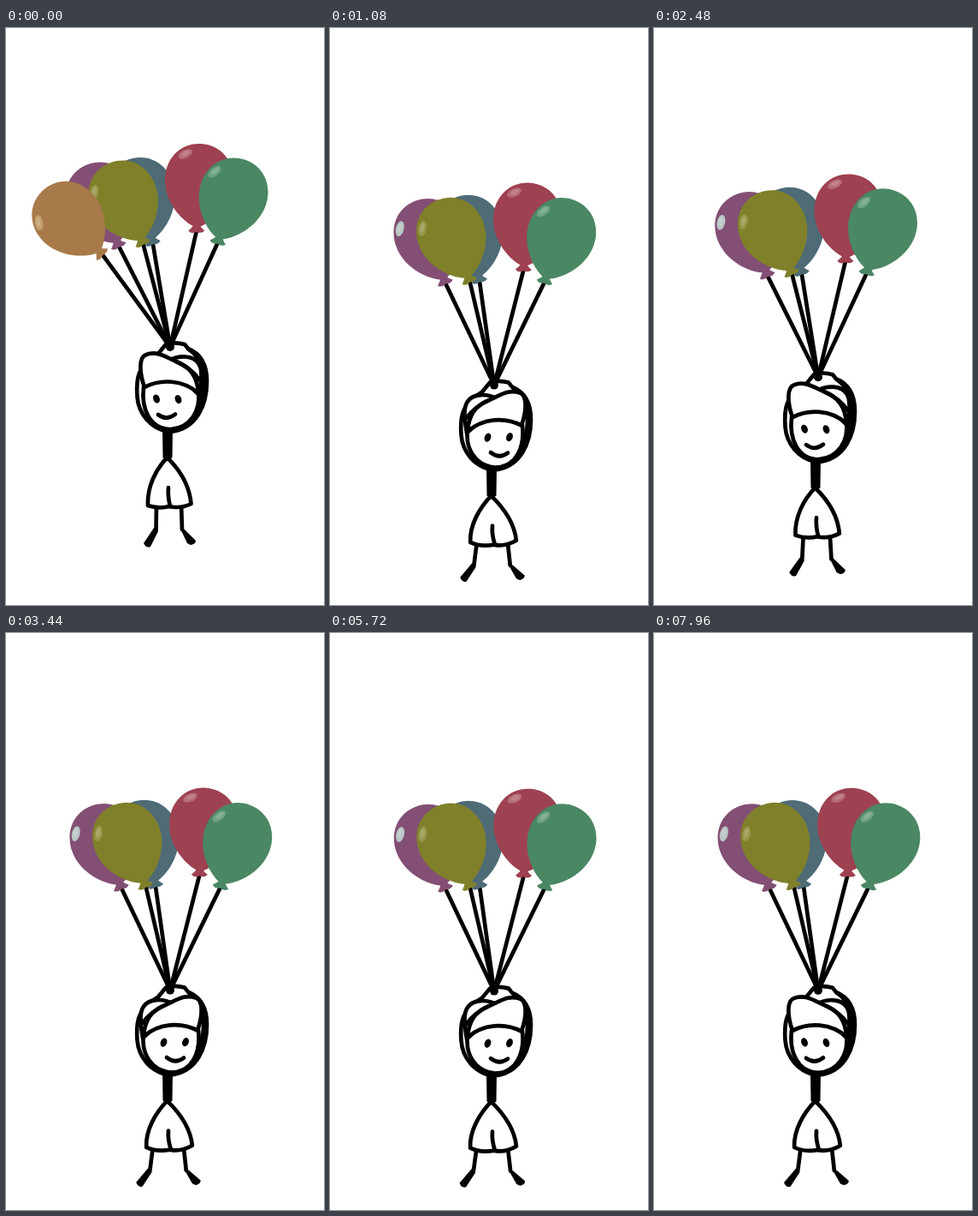
An HTML page that plays this animation: 372 px wide and 673 px high, repeating every 8000 ms.

```html
<!DOCTYPE html>
<html lang="en">
<head>
<meta charset="utf-8">
<title>Balloon ride</title>
<style>
  html, body { margin: 0; width: 100%; height: 100%; overflow: hidden; background: #fff; }
  svg { display: block; width: 100%; height: 100%; }
  .ink { fill: none; stroke: #000; stroke-width: 4.7; stroke-linecap: round; stroke-linejoin: round; }
  .white { fill: #fff; }
</style>
</head>
<body>
<svg viewBox="0 0 372 673">
  <g id="rider">
    <g id="bunch"></g>
    <g id="legL">
      <path class="ink" d="M176 556 L175.5 586"/>
      <path d="M173 583 L178 587 L173 597 L169 605 Q164 607 161 601 Z"/>
    </g>
    <g id="legR">
      <path class="ink" d="M205 556 L206 585"/>
      <path d="M203.5 583 L209 585 L222 598 Q222 602 216 603 L212 601 Z"/>
    </g>
    <path id="skirt" class="ink white"/>
    <path id="slit" class="ink"/>
    <path d="M183 468 H195 L194.500 501 L189 505 L183.500 501 Z"/>
    <path class="ink" d="M190 471 C169 467 155 450 153.500 430 C152 408 154 394 178 380 L187 369 C193 367 202 367 209 369 L213 374 C228 380 235 393 235 412 C235 438 224 469 190 471"/>
    <path class="ink" stroke-width="3" d="M214 375 C225 382 231 396 231 414 C231 434 222 453 208 464"/>
    <g id="head">
      <path class="ink white" d="M161 419 C158 444 168 468 193 468 C216 466 228 446 225 424 C207 407 181 408 161 419"/>
      <path class="ink white" d="M190 388 C203 381 219 382 225 391 C231 399 228 414 226 428 L205 408 Z"/>
      <path class="ink white" d="M162 419 C156 402 155 384 164 381 C177 376 187 384 199 389 C213 394 224 404 225 426 C207 410 181 409 162 419 Z"/>
      <path class="ink" d="M199 389 Q217 397 226 410"/>
      <ellipse cx="176" cy="432.500" rx="3.700" ry="5.200" transform="rotate(-22 176 432.500)"/>
      <ellipse cx="201.500" cy="433" rx="3.700" ry="5.200" transform="rotate(-22 201.500 433)"/>
      <path class="ink" d="M178 451 Q188 458.500 198 450.500"/>
    </g>
    <circle cx="192" cy="372" r="5"/>
  </g>
  <g id="stray"></g>
</svg>
<script>
const LOOP = 8000, STEP = 40;
const HALF = 1180;          // one swing up or down
const LOW = 970;            // time of the first lowest point
const GRIP = [192, 372];    // where all strings meet

const $ = id => document.getElementById(id);
const [rider, bunch, stray, head, legL, legR, skirt, slit] =
  ['rider', 'bunch', 'stray', 'head', 'legL', 'legR', 'skirt', 'slit'].map($);

const BODY = 'M0-41C24-41 40-22 40 1C40 27 20 48 5 55Q0 57-5 55C-20 48-40 27-40 1C-40-22-24-41 0-41Z';
const KNOT = 'M-3 53L3 53Q5 57 9.500 60Q6 64 0 62Q-6 65-9.500 61Q-5 57-3 53Z';

function balloon(x, y, tilt, color, shine, turn = 0) {
  return `<g transform="translate(${x} ${y}) rotate(${tilt})">
    <path d="${BODY}${KNOT}" fill="${color}"/>
    <g transform="rotate(${turn}) translate(-29 -16.500) rotate(-57)">
      <ellipse rx="9" ry="4.700" fill="${shine}"/>
      <ellipse cx="1" cy="-.5" rx="5.500" ry="2.500" fill="#fff" opacity=".15"/>
    </g></g>`;
}

function string(x, y, tilt) {
  const a = tilt * Math.PI / 180;
  const kx = x - 61 * Math.sin(a), ky = y + 61 * Math.cos(a);
  return `<path class="ink" style="stroke-linecap:butt" d="M${kx} ${ky}L${GRIP}"/>`;
}

const held = [
  [157, 192, -14, '#4e6b76', '#73909a'],
  [110, 197.500, -21, '#834f74', '#b9c7c5'],
  [136.500, 195.500, -23, '#80802a', '#98984e'],
  [226, 176, 3, '#9e4150', '#b66c78', 28],
  [266.500, 192.500, 18, '#4a8763', '#70a384']
];
const loose = [71, 219.500, -43, '#a87a4a', '#c29e70'];

bunch.innerHTML = held.map(b => string(...b)).join('') + held.map(b => balloon(...b)).join('');
stray.innerHTML = string(...loose) + balloon(...loose);

function draw(t) {
  const first = t < LOW;
  const n = Math.floor((t - LOW) / HALF);
  const p = (t - LOW) / HALF - n;
  const s = first ? t / LOW : n % 2 ? p : 1 - p;   // 0 at the top, 1 at the bottom
  const drop = first ? 46 * s : 31 + 15 * s;
  const facingRight = !first && n % 2 === 0;

  rider.setAttribute('transform', `translate(0 ${drop})`);
  bunch.setAttribute('transform', `rotate(${1.65 * s} ${GRIP})`);
  head.setAttribute('transform', facingRight ? 'translate(386 0) scale(-1 1)' : '');
  legL.setAttribute('transform', `translate(0 ${-1.5 * s}) rotate(${7 * s} 188 520)`);
  legR.setAttribute('transform', `translate(0 ${-1.5 * s}) rotate(${-4.7 * s} 188 520)`);

  const l = 166 - 2 * s, r = 216.500 + 1.500 * s, b = 557 - 2 * s;
  skirt.setAttribute('d', `M188.500 501C175 515 ${l - 1} 535 ${l} ${b}Q${l + 12} 561 ${191 + s} 558
    Q204 561 ${r} ${b - 2}C${r - 2} 532 203 515 188.500 501Z`);
  slit.setAttribute('d', `M190 536Q189 546 ${192 + s} 558`);

  const u = t / 1060;
  stray.setAttribute('display', u < 1 ? 'inline' : 'none');
  stray.setAttribute('transform', `translate(${-200 * u ** 2.700} ${-50 * u ** 2})`);
}

const start = performance.now();
function tick() {
  const t = (performance.now() - start) % LOOP;
  draw(Math.floor(t / STEP) * STEP);
  requestAnimationFrame(tick);
}
tick();
</script>
</body>
</html>
```
